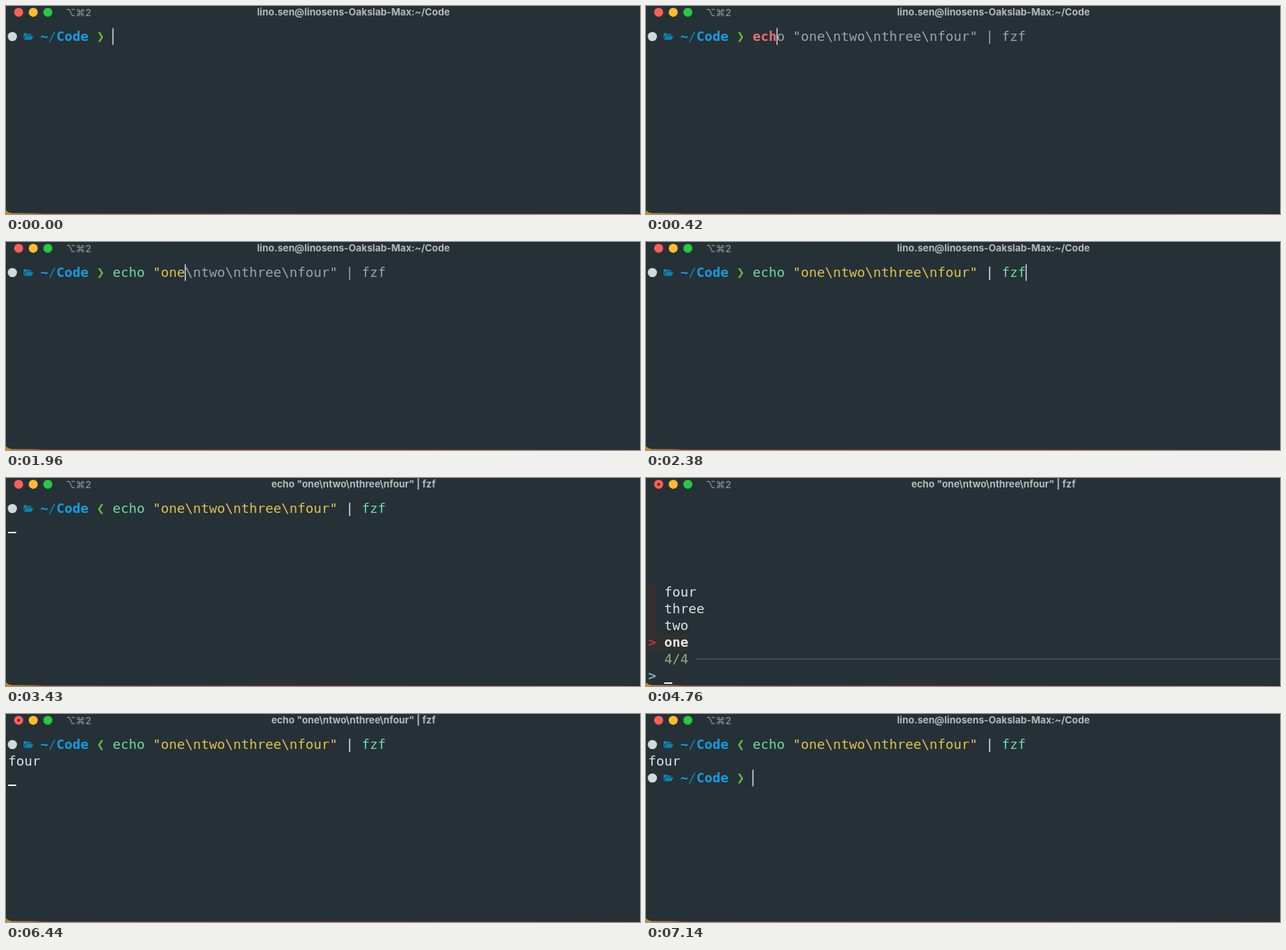
Write an HTML page that moves like this. It is 868 px wide and 286 px high and loops after 7210 ms.

```html
<!DOCTYPE html>
<html lang="en">
<head>
<meta charset="utf-8">
<title>Terminal session</title>
<style>
html, body { margin: 0; width: 100%; height: 100%; overflow: hidden; background: #253137; }
svg { display: block; width: 868px; height: 286px; }
text { white-space: pre; }
.mono { font: 18.27px "DejaVu Sans Mono", monospace; }
.bold { font-weight: 700; }
.ui { font: 700 13.2px Inter, sans-serif; }
</style>
</head>
<body>
<svg viewBox="0 0 868 286" xmlns="http://www.w3.org/2000/svg">
  <defs>
    <linearGradient id="edge">
      <stop offset="0" stop-color="#d98a1c"/>
      <stop offset=".045" stop-color="#a8641e"/>
      <stop offset=".06" stop-color="#6e3a24"/>
      <stop offset=".5" stop-color="#6a2a22"/>
      <stop offset="1" stop-color="#4a2426"/>
    </linearGradient>
  </defs>
  <rect y="276" width="868" height="10" fill="url(#edge)"/>
  <path d="M0 0H868V284.8H9Q3 284.8 0 280.5Z" fill="#253137"/>
  <circle cx="17.3" cy="8.7" r="6.2" fill="#fe5f57"/>
  <circle cx="37.3" cy="8.7" r="6.2" fill="#febc2e"/>
  <circle cx="57.3" cy="8.7" r="6.2" fill="#28c840"/>
  <circle id="dot" cx="17.3" cy="8.7" r="2" fill="#7a1512"/>
  <text class="ui" x="82" y="13.5" fill="#7f898d" style="font-weight:600">⌥⌘2</text>
  <text class="ui" id="title" x="475.7" y="13.4" text-anchor="middle" fill="#b3babc"></text>
  <g id="screen"></g>
</svg>
<script>
const LOOP = 7210, COL = 11, ROW = 23, LEFT = 3;
const COMMAND = 'echo "one\\ntwo\\nthree\\nfour" | fzf';
const HOME_TITLE = 'lino.sen@linosens-Oakslab-Max:~/Code';
const C = {
  white: '#dfe5e6', ghost: '#9ba5a8', green: '#72d9a3', yellow: '#e2c34a', red: '#ef6b73',
  path: '#129fe0', dim: '#0d83b3', arrow: '#5ebf35', pointer: '#c82f52',
  match: '#afd3b4', info: '#a3a583', query: '#86a8b8', row: '#32302f', rule: '#526168'
};
// [time, characters typed at the shell]
const SHELL = [[0, 0], [140, 1], [350, 2], [420, 3], [490, 4], [630, 5],
  [1400, 6], [1540, 7], [1820, 8], [1960, 9], [2240, COMMAND.length]];
// [time, characters typed into the finder]
const FINDER = [[0, 0], [5110, 1], [5320, 2], [5390, 3], [5530, 4]];
const SUGGEST = 210, RUN = 3430, OPEN = 3500, EDITED = 4200, PICK = 6440, DONE = 6510;

const $ = id => document.getElementById(id);
const at = (steps, t) => steps.filter(s => s[0] <= t).pop()[1];
const x = col => LEFT + col * COL;
const mid = row => 42 + row * ROW;
const esc = s => s.replace(/&/g, '&amp;').replace(/</g, '&lt;').replace(/>/g, '&gt;');

function put(row, col, str, color, bold) {
  return str ? `<text class="mono${bold ? ' bold' : ''}" x="${x(col)}" y="${mid(row) + 6}" fill="${color}">${esc(str)}</text>` : '';
}
function box(left, top, w, h, color) {
  return `<rect x="${left}" y="${top}" width="${w}" height="${h}" fill="${color}"/>`;
}
const bar = (row, col) => box(x(col) - .2, mid(row) - 11.5, 1.3, 23, '#e6ebec');
const underline = (row, col) => box(x(col), mid(row) + 9, COL, 2, '#f2f5f5');

function prompt(row, mark) {
  const y = mid(row);
  return `<circle cx="8.7" cy="${y}" r="6.3" fill="#d3d9da"/>` +
    `<path transform="translate(24 ${y - 5})" fill="${C.dim}" d="M0 8.4V1.3Q0 .2 1.1.2H4L5.4 1.6H9.4Q10.5 1.6 10.5 2.6V3.4H3.8Q2.8 3.4 2.3 4.2ZM.5 9.6L3 5Q3.3 4.3 4 4.3H12.6Q13.6 4.3 13.1 5.2L11 9Q10.6 9.6 9.9 9.6Z"/>` +
    put(row, 4, '~', C.path, true) + put(row, 5, '/', C.dim) +
    put(row, 6, 'Code', C.path, true) + put(row, 11, mark, C.arrow);
}

function command(row, n, ghost) {
  const part = (from, to, color, bold) =>
    put(row, 13 + from, COMMAND.slice(from, Math.min(to, n)), color, bold);
  return part(0, 4, n < 4 ? C.red : C.green, n < 4) +
    part(5, 28, C.yellow) + part(29, 30, C.white) + part(31, 34, C.green) +
    (ghost ? put(row, 13 + n, COMMAND.slice(n), C.ghost) : '');
}

function finder(n) {
  const query = 'four'.slice(0, n);
  const best = n ? 'four' : 'one';
  let out = '';
  if (!n) {
    out += box(x(0), 145.5, COL, 69, C.row);
    ['four', 'three', 'two'].forEach((word, i) => out += put(5 + i, 2, word, C.white));
  }
  return out + box(x(0), 214.5, COL * (2 + best.length), ROW, C.row) +
    put(8, 0, '>', C.pointer, true) +
    put(8, 2, query, C.match, true) +
    put(8, 2 + n, best.slice(n), '#e4e8e8', true) +
    put(9, 2, n ? '1/4' : '4/4', C.info) +
    box(x(6), 248.3, 868 - x(6), 1.2, C.rule) +
    put(10, 0, '>', C.query, true) + put(10, 2, query, '#e4e8e8', true) +
    underline(10, 2 + n);
}

function screen(t) {
  if (t < RUN) {
    const n = at(SHELL, t);
    return prompt(0, '❯') + command(0, n, t >= SUGGEST) + bar(0, 13 + n);
  }
  if (t >= OPEN && t < PICK) return finder(at(FINDER, t));
  const ran = prompt(0, '❮') + command(0, COMMAND.length);
  if (t < OPEN) return ran + underline(1, 0);
  const result = ran + put(1, 0, 'four', C.white);
  return t < DONE ? result + underline(2, 0) : result + prompt(2, '❯') + bar(2, 13);
}

let shown = '';
function draw(t) {
  const next = screen(t);
  if (next !== shown) $('screen').innerHTML = shown = next;
  const title = t >= RUN && t < DONE ? COMMAND : HOME_TITLE;
  if ($('title').textContent !== title) $('title').textContent = title;
  $('dot').style.display = t >= EDITED && t < DONE ? '' : 'none';
}

const start = performance.now();
function tick() {
  draw((performance.now() - start) % LOOP);
  requestAnimationFrame(tick);
}
tick();
</script>
</body>
</html>
```
